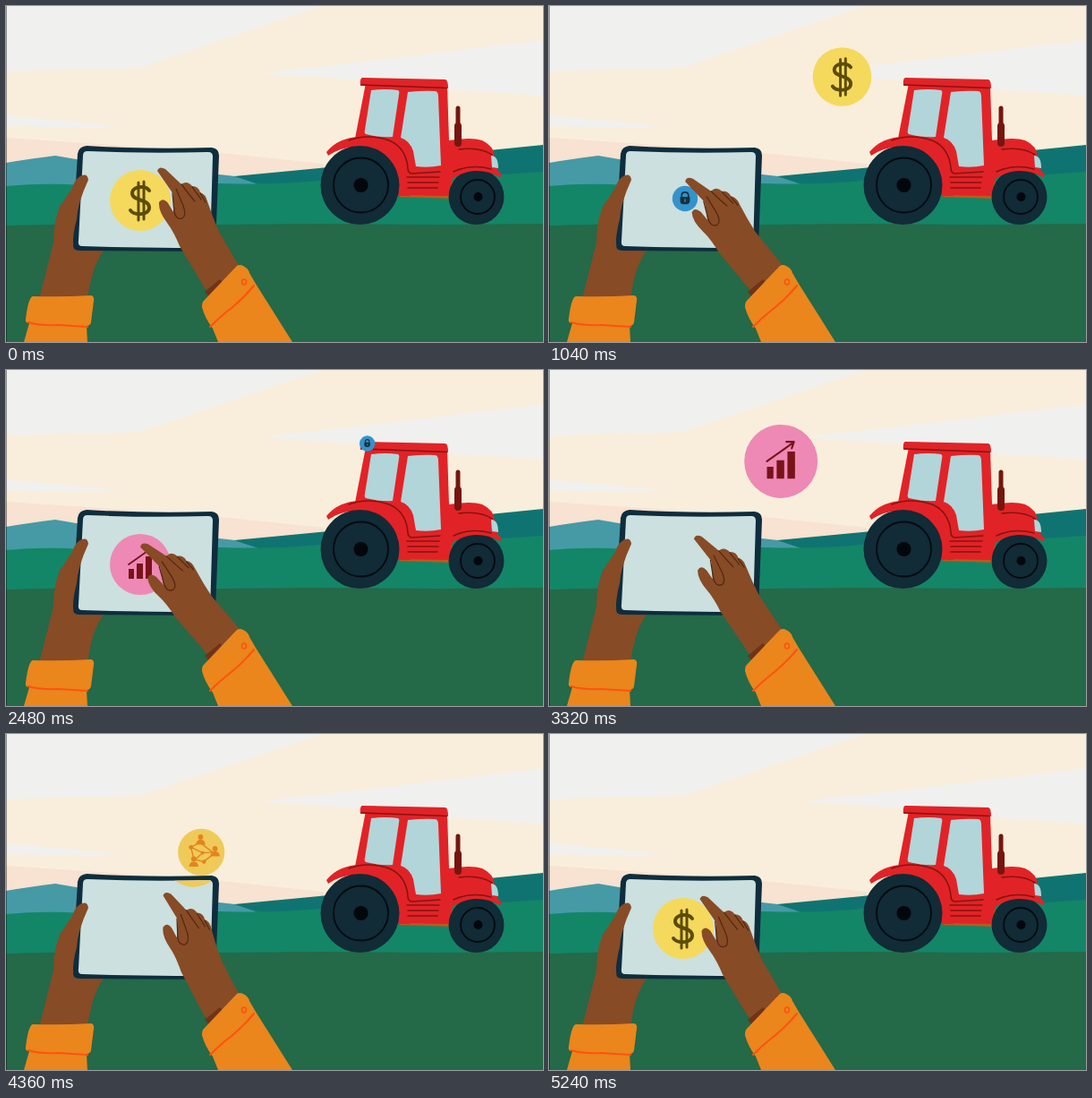
These frames come from a looping animation (600x375 px, 5.28 s). An HTML page:

```html
<!DOCTYPE html>
<html lang="en">
<head>
<meta charset="utf-8">
<title>Tablet and tractor</title>
<style>
html, body { margin: 0; width: 100%; height: 100%; overflow: hidden; background: #f9eedb; }
svg { display: block; width: 100vw; height: 100vh; }
.line { fill: none; stroke-linecap: round; stroke-linejoin: round; }
</style>
</head>
<body>
<svg viewBox="0 0 600 375" preserveAspectRatio="none">
<defs>
  <clipPath id="screen"><path d="M91 162Q158 165 226 163Q231 163 231 168L228 270Q150 270 85 268Q80 268 81 262L86 167Q86 162 91 162Z"/></clipPath>
  <g id="dollar">
    <circle r="34" fill="#f5d95c"/>
    <path class="line" stroke="#5d4c06" stroke-width="4" d="M10-11C6-17-9-16-9-8C-9 1 10-2 10 8C10 17-7 17-11 11"/>
    <path class="line" stroke="#5d4c06" stroke-width="3" d="M-2-20V22M4-21V21"/>
  </g>
  <g id="lock">
    <circle r="34" fill="#3493cb"/>
    <path class="line" stroke="#17303f" stroke-width="4" d="M-9-6V-9C-9-20 9-20 9-9V-4"/>
    <path fill="#17303f" d="M-13-5H13V6Q12 15 4 15H-5Q-13 15-13 6Z"/>
    <path class="line" stroke="#3493cb" stroke-width="3" d="M0 2V8"/>
  </g>
  <g id="chart">
    <circle r="34" fill="#ee88b4"/>
    <path fill="#79131a" d="M-13 5H-7V16H-13ZM-4-1H3V16H-4ZM6-9H13V16H6Z"/>
    <path class="line" stroke="#79131a" stroke-width="1.8" d="M-13 0L11-17M5-18L12-18L10-12"/>
  </g>
  <g id="network">
    <circle r="34" fill="#efca59"/>
    <path class="line" stroke="#e2851f" stroke-width="1.8" d="M-2-14L-15-7L-11 10L3 14L19 2L-2-14M-15-7L2 1L19 0M2 1L-10 12"/>
    <g fill="#e2851f">
      <circle cx="-15" cy="-7" r="3.2"/><circle cx="4" cy="14" r="3"/><circle cx="2" cy="1" r="2.5"/>
      <g id="person"><circle cx="-1" cy="-22" r="3.8"/><path d="M-8-11Q-7-18-1-18Q5-18 6-11Z"/></g>
      <use href="#person" x="21" y="17"/><use href="#person" x="-10" y="32"/>
    </g>
  </g>
</defs>

<!-- sky and land -->
<rect width="600" height="375" fill="#f9eedb"/>
<g fill="#f0f0ee">
  <path d="M0 0H353L155 67Q140 71 90 70L0 73Z"/>
  <path d="M286 76Q300 72 365 66L600 38V100L470 92Q380 80 286 76Z"/>
  <path d="M0 122L130 134L90 136L0 134Z"/>
</g>
<path fill="#f8e2d1" d="M0 147L90 153L240 164L355 176V200H0Z"/>
<path fill="#459aa6" d="M0 175Q30 170 55 167L90 173L238 188L330 198V215H0Z"/>
<path fill="#0f7471" d="M255 190L350 181L470 168L600 155V215H330Z"/>
<path fill="#138667" d="M0 201Q45 197 85 200L238 198Q300 200 350 195L555 188L600 185V250H0Z"/>
<path fill="#246948" d="M0 245L90 243L240 244L350 243L480 244L600 243V375H0Z"/>

<!-- tractor -->
<path fill="#bd5a1b" d="M428 196H502L498 215L440 213Z"/>
<path fill="#e12327" d="M402 86L493 89L495 150Q520 146 532 150Q545 156 546 168L550 186L500 188L494 212L440 211L432 175L388 158Z"/>
<path fill="#e12327" d="M398 80L491 82Q494 83 494 92L396 89Q395 81 398 80Z"/>
<path class="line" stroke="#87130f" stroke-width="1.6" d="M397 88L492 91.5"/>
<g fill="#b2d5d9">
  <path d="M408 94Q424 92 438 94Q440 95 439 99L432 146Q418 147 402 143Q400 142 401 138Z"/>
  <path d="M449 96Q467 94 480 95Q483 96 483 101L486 178Q472 181 458 179L455 162Q451 150 441 147Z"/>
  <path d="M542 167Q550 167 550 181L543 180Z"/>
</g>
<path fill="#e12327" d="M358 163Q372 146 397 146Q448 146 455 178L452 212H438Q432 165 395 158Q376 156 360 167Z"/>
<path class="line" stroke="#87130f" stroke-width="1.6" d="M383 150Q404 142 428 150Q447 158 449 181Q449 186 453 187L485 185M448 191H484M449 197H483M449 203H482M506 160Q530 157 543 166"/>
<path class="line" stroke="#76150f" stroke-width="5" d="M505 114V137"/>
<path class="line" stroke="#76150f" stroke-width="8" d="M505 134V153"/>
<circle cx="395.500" cy="200" r="44" fill="#112b37"/>
<circle cx="396.500" cy="200" r="30.500" fill="none" stroke="#030b10" stroke-width="1.800"/>
<circle cx="396.500" cy="200" r="8" fill="#02070b"/>
<circle cx="525.500" cy="213" r="31" fill="#112b37"/>
<circle cx="527" cy="213" r="19" fill="none" stroke="#030b10" stroke-width="1.800"/>
<circle cx="527.500" cy="213" r="5" fill="#02070b"/>
<path fill="#e12327" d="M496 193Q506 179 527 178Q545 178 554 188L552 191Q538 183 523 184Q510 185 499 193Z"/>
<path class="line" stroke="#87130f" stroke-width="1.500" d="M500 185Q519 176 542 182"/>

<!-- left hand holding the tablet -->
<path fill="#874b26" d="M82 205L61 222Q53 239 53 264L37 327H91Q96 290 109 273L84 260Z"/>
<path fill="#0e2d3d" d="M90 156Q155 160 230 158Q238 159 238 167L234 268Q233 274 226 274L82 273Q74 273 74 265L80 165Q81 157 90 156Z"/>
<path fill="#cbe0df" d="M91 162Q158 165 226 163Q231 163 231 168L228 270Q150 270 85 268Q80 268 81 262L86 167Q86 162 91 162Z"/>
<g id="inside" clip-path="url(#screen)"></g>
<path fill="#874b26" d="M92 194Q91 187 85 189Q78 191 74 203L60 224L54 272L76 273Q73 260 79 238Q80 220 92 194Z"/>
<path fill="#ea861c" d="M30 324Q62 325 95 323Q99 324 98 329L95 353Q94 357 90 357L91 375H20L26 354Q21 354 22 349Q25 325 30 324Z"/>
<path class="line" stroke="#ff5210" stroke-width="2" d="M25 353Q38 357 58 356L91 358"/>

<g id="outside"></g>

<!-- right hand -->
<g id="hand">
  <path fill="#874b26" d="M169 184Q171 178 178 182L196 199Q202 194 208 201Q215 201 217 208Q223 210 225 218Q231 236 238 252L262 293L240 326L222 315L194 268Q187 251 180 242Q170 229 171 219Q175 213 181 220L187 230L187 210Z"/>
  <path class="line" stroke="#562910" stroke-width="1.300" d="M186 209L188 230Q190 239 197 237Q202 234 198 223L190 204M196 199Q205 211 211 218M208 202L218 216M217 209L223 219"/>
</g>
<path fill="#6d3418" d="M222 319L239 305L244 310L228 326Z"/>
<path fill="#ea861c" d="M220 330L258 290Q261 288 265 290Q271 293 272 298L279 310L320 375H237L231 360Q222 348 219 336Q219 332 220 330Z"/>
<path class="line" stroke="#ff5210" stroke-width="2" d="M228 358Q238 348 248 340Q264 328 277 312"/>
<ellipse class="line" cx="266" cy="308" rx="2.500" ry="3" stroke="#ff5210" stroke-width="1.500"/>
<path d="M.5 0V375" stroke="#000" stroke-opacity=".4"/>
</svg>
<script>
const LOOP = 5280, LEAD = 400;
const icons = [['dollar', 0], ['lock', 1360], ['chart', 2640], ['network', 3880]];

// Keys: time, then values
const bubble = [[-400, 152, 215, 0], [-320, 152, 215, 14], [-200, 150, 217, 34], [0, 150, 217, 34],
  [200, 150, 217, 34], [320, 163, 192, 34], [440, 194, 147, 34], [480, 209, 137, 34], [560, 240, 112, 34]];
const flight = [[360, 193, 158, 6], [440, 209, 141, 21], [480, 218, 132, 26], [680, 259, 102, 41],
  [900, 300, 83, 41], [1040, 327, 79, 33], [1120, 403, 82, 9], [1160, 410, 86, 0]];
const tilt = [[-400, -8], [-320, -8.9], [-160, -10.1], [-40, -.3], [0, 0], [200, 2],
  [440, 3.2], [500, 3.2], [680, -3.6], [840, -8], [1000, -8]];

// Smooth curve through the keys
function sample(keys, t) {
  const last = keys.length - 1;
  t = Math.min(Math.max(t, keys[0][0]), keys[last][0]);
  let i = 0;
  while (i < last - 1 && t > keys[i + 1][0]) i++;
  const a = keys[i], b = keys[i + 1], d = b[0] - a[0], u = (t - a[0]) / d;
  const before = keys[Math.max(i - 1, 0)], after = keys[Math.min(i + 2, last)];
  return a.slice(1).map((v, k) => {
    const j = k + 1, w = b[j];
    if (v === w) return v;
    const m = (w - before[j]) / (b[0] - before[0]) * d;
    const n = (after[j] - v) / (after[0] - a[0]) * d;
    const s = u * u * (3 - 2 * u);
    return v + (w - v) * s + m * u * (1 - u) ** 2 - n * u * u * (1 - u);
  });
}

function addIcon(layer, name) {
  const use = document.createElementNS('http://www.w3.org/2000/svg', 'use');
  use.setAttribute('href', '#' + name);
  return document.getElementById(layer).appendChild(use);
}

function place(node, keys, t) {
  const shown = t >= keys[0][0] && t < keys[keys.length - 1][0];
  node.style.display = shown ? '' : 'none';
  if (!shown) return;
  const [x, y, r] = sample(keys, t);
  node.setAttribute('transform', `translate(${x} ${y}) scale(${Math.max(r, 0) / 34})`);
}

const parts = icons.map(([name, start]) =>
  ({ start, inner: addIcon('inside', name), outer: addIcon('outside', name) }));
const hand = document.getElementById('hand');

function draw(time) {
  const phases = parts.map(p => (time - p.start + LEAD + LOOP) % LOOP - LEAD);
  parts.forEach((p, i) => {
    place(p.inner, bubble, phases[i]);
    place(p.outer, flight, phases[i]);
  });
  hand.setAttribute('transform', `rotate(${sample(tilt, Math.min(...phases))[0]} 238 298)`);
}

const begin = performance.now();
function tick() {
  draw((performance.now() - begin) % LOOP);
  requestAnimationFrame(tick);
}
tick();
</script>
</body>
</html>
```
